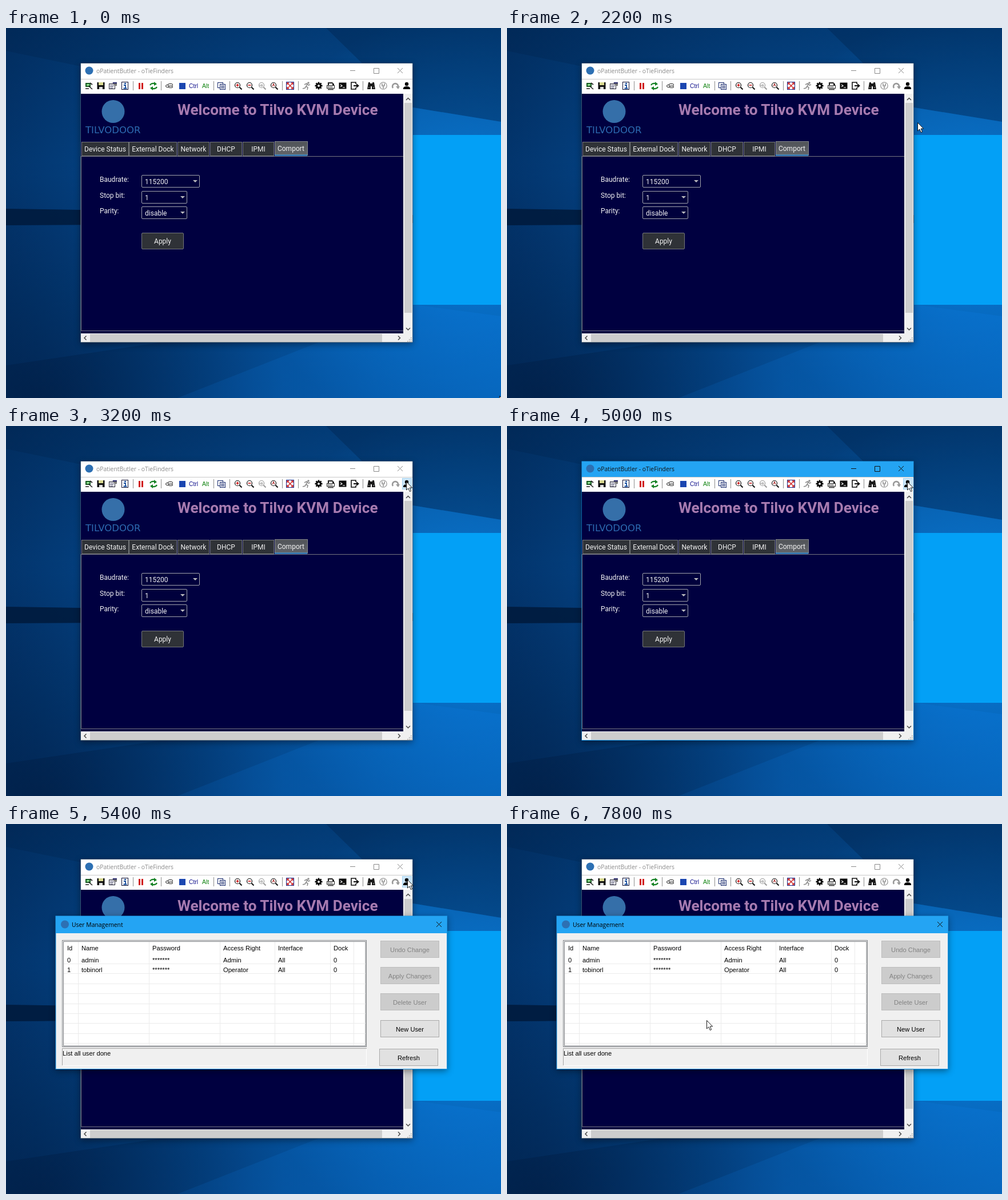
Animation of 866 by 647 pixels, one loop 8000 ms. Source, as an HTML page:

```html
<!DOCTYPE html>
<html lang="en">
<head>
<meta charset="utf-8">
<title>User management</title>
<style>
html, body { margin: 0; width: 100%; height: 100%; overflow: hidden; background: #04407f; }
svg { display: block; }
text { white-space: pre; }
.cap { font: 10.4px "Open Sans", sans-serif; }
.web { font: 12px Roboto, sans-serif; fill: #f2f2f2; }
.win { font: 11.15px "Liberation Sans", Arial, sans-serif; }
.key { font: 10.3px "Liberation Sans", Arial, sans-serif; }
.mid { text-anchor: middle; }
.shade { filter: drop-shadow(0 3px 6px rgba(0,0,0,.42)); }
.ln { fill: none; stroke: currentColor; }
</style>
</head>
<body>
<svg id="stage" width="866" height="647" viewBox="0 0 866 647">
  <defs>
    <linearGradient id="base"><stop stop-color="#023268"/><stop offset=".5" stop-color="#044b92"/><stop offset="1" stop-color="#0559a8"/></linearGradient>
    <linearGradient id="dusk" x2="0" y2="1"><stop stop-color="#001c40" stop-opacity=".4"/><stop offset=".4" stop-color="#001c40" stop-opacity="0"/></linearGradient>
    <radialGradient id="corner" gradientUnits="userSpaceOnUse" cx="60" cy="660" r="430"><stop stop-color="#001434" stop-opacity=".6"/><stop offset="1" stop-color="#001434" stop-opacity="0"/></radialGradient>
    <radialGradient id="glow" gradientUnits="userSpaceOnUse" cx="800" cy="350" r="380"><stop stop-color="#0a8cee" stop-opacity=".7"/><stop offset="1" stop-color="#0a7ee0" stop-opacity="0"/></radialGradient>
    <linearGradient id="beam"><stop stop-color="#0a6ccc" stop-opacity=".06"/><stop offset="1" stop-color="#0a7ade" stop-opacity=".3"/></linearGradient>
    <linearGradient id="tabOn" x2="0" y2="1"><stop stop-color="#505358"/><stop offset="1" stop-color="#63666b"/></linearGradient>
  </defs>
  <g id="wall">
    <path fill="url(#base)" d="M0 0H866V647H0z"/>
    <path fill="url(#dusk)" d="M0 0H866V647H0z"/>
    <path fill="url(#corner)" d="M0 0H866V647H0z"/>
    <path fill="url(#glow)" d="M0 0H866V647H0z"/>
    <path fill="url(#beam)" d="M714 188L0 40V316L714 327zM714 341L0 345V590L714 484zM714 484L866 504V647H300z"/>
    <path fill="#00244e" opacity=".4" d="M560 0H866V164L700 137z"/>
    <path fill="#0d74c8" opacity=".35" d="M700 137L866 164V190H700z"/>
    <path fill="#011b3d" opacity=".85" d="M0 316L712 327V341L0 345z"/>
    <path fill="#03a0f6" d="M712 187h297v297h-297z"/>
  </g>
  <g id="viewer"></g>
  <g id="dialog"></g>
  <path id="cursor" fill="#fff" stroke="#000" stroke-width=".9" d="M.5.5V15L3.8 11.9L6.3 17.6L8.6 16.6L6.2 11H10.6z"/>
</svg>
<script>
const $ = id => document.getElementById(id);
const rect = (x, y, w, h, fill, more = '') =>
  `<rect x="${x}" y="${y}" width="${w}" height="${h}" fill="${fill}" ${more}/>`;
const box = (x, y, w, h, fill, edge, more = '') =>
  rect(x + .5, y + .5, w - 1, h - 1, fill, `stroke="${edge}" ${more}`);
const text = (x, y, s, cls, fill) =>
  `<text x="${x}" y="${y}" class="${cls}"${fill ? ` fill="${fill}"` : ''}>${s}</text>`;
const path = (d, color, w = 1) =>
  `<path d="${d}" class="ln" color="${color}" stroke-width="${w}"/>`;
const solid = (d, fill) => `<path d="${d}" fill="${fill}"/>`;
const dot = (x, y, r, fill) => `<circle cx="${x}" cy="${y}" r="${r}" fill="${fill}"/>`;

// Toolbar icons, drawn around their own centre
const lens = (c, inner) =>
  `<circle cx="-1" cy="-1" r="4.5" fill="#fff" stroke="${c}" stroke-width="1.2"/>` +
  path('M2.5 2.5L6.5 6.5', c, 2) + inner;
const spokes = [0, 45, 90, 135].map(a => `<path d="M0-6.5V6.5" stroke="#000" stroke-width="2.6" transform="rotate(${a})"/>`).join('');
const icons = [
  [145, rect(-6, -5, 9, 7, '#175b23') + rect(-4, -3, 5, 3, '#8fe08f') + path('M-1 0L6 6M-6 5H0M2-5L6-2', '#222', 1.6)],
  [166, rect(-6.5, -6, 13, 12, '#111') + rect(-4, -6, 8, 5, '#d8d890') + rect(-3, 2, 6, 4, '#ddd')],
  [187, box(-7, -4, 11, 10, '#fff', '#223') + path('M-5-1H2M-5 1.5H1M-5 4H0', '#446') + solid('M-1-6H7V0H3z', '#777') + path('M0-5H7', '#226', 2)],
  [208, box(-6, -7, 12, 14, '#fff', '#113') + rect(-1, -5, 3, 2, '#124a9c') + path('M-2-1H1V4M-2.5 4.5H3.5', '#124a9c', 1.8)],
  [236, rect(-4, -5, 3, 11, '#d01818') + rect(1, -5, 3, 11, '#d01818')],
  [258, path('M-6-1Q-4-5 2-4M6 2Q4 6-2 5', '#138022', 2.2) + solid('M1-7L6-3L1 0zM-1 8L-6 4L-1 1z', '#138022')],
  [286, box(-7, -2, 8, 5, '#eee', '#222', 'rx="2"') + box(-3, -4, 9, 5, '#eee', '#222', 'rx="2"') + box(-2, 0, 8, 4, '#eee', '#222', 'rx="2"')],
  [308, rect(-5, -5, 11, 11, '#1b46b0')],
  [377, box(-7, -6, 10, 10, '#fff', '#16286c') + box(-3, -3, 10, 10, '#fff', '#16286c') + path('M-1 0H5M-1 2H5M-1 4H5', '#16286c')],
  [406, lens('#111', path('M-3.5-1H1.5M-1-3.5V1.5', '#c11', 1.5))],
  [427, lens('#111', path('M-3.5-1H1.5', '#c11', 1.5))],
  [448, lens('#999', path('M-3.5-2V1M-1.5-2H.5V1H-1.5z', '#999'))],
  [469, lens('#111', path('M-3 1L-1-4L1 1M-2-1H0', '#a22'))],
  [497, box(-7, -7, 14, 14, '#fff', '#1a2a8c') + path('M-5-5L5 5M5-5L-5 5', '#c22', 1.4) + path('M-5-2V-5H-2M2-5H5V-2M5 2V5H2M-2 5H-5V2', '#c22', 1.5)],
  [526, dot(3, -5, 1.8, '#8d8d8d') + path('M-4-2L0-4L3-1L6-2M1-3L-1 1L2 3L1 7M-1 1L-3 4L-7 5', '#8d8d8d', 1.6)],
  [547, spokes + dot(0, 0, 4.8, '#000') + dot(0, 0, 2, '#fff')],
  [568, solid('M-5-6H3L6-3V0H-5z', '#222') + rect(-3, -4, 6, 3, '#fff') + box(-7, -1, 14, 6, '#fff', '#222') + path('M-4 1V3M-1 1V3M2 1V3M-5 6.5H5', '#222', 1.5)],
  [589, rect(-6.5, -5.5, 13, 11, '#0a0a0a') + path('M-4-2L-1 0L-4 2M0 3H4', '#fff', 1.2)],
  [610, path('M2-3V-6H-6V6H2V3', '#111', 1.6) + path('M-2 0H5', '#111', 2) + solid('M3-4L8 0L3 4z', '#111')],
  [639, solid('M-5-6H-2V-4H2V-6H5L7 6H1V1H-1V6H-7z', '#1b1b1b') + path('M-5 3H-3M3 3H5', '#bbb')],
  [660, `<circle r="6.2" fill="#fff" stroke="#999" stroke-width="1.3"/>` + path('M-2-4V0H2V-4M0 0V5', '#999', 1.7)],
  [681, path('M-4 4A5 5 0 1 1 5 2', '#999', 2.6) + solid('M1 1H8L5 6z', '#999')],
  [701, dot(0, -3, 3.2, '#000') + solid('M-6 6V4Q-5 1 0 1Q5 1 6 4V6z', '#000')]
];
const toolbar = icons.map(([x, art]) => `<g transform="translate(${x} 101)">${art}</g>`).join('') +
  path([222, 271, 363, 391, 483, 511, 624].map(x => `M${x}.5 93V109`).join(''), '#8c8c8c') +
  text(320, 104.5, 'Ctrl', 'key', '#10108c') + text(343, 104.5, 'Alt', 'key', '#0b800b');

const tabs = [
  [132, 83, 'Device Status'], [215, 84, 'External Dock'], [300, 56, 'Network'],
  [357, 56, 'DHCP'], [414, 55, 'IPMI']
].map(([x, w, s]) => box(x, 199, w, 25, '#2f3237', '#75787b') + text(x + w / 2, 216, s, 'web mid')).join('') +
  box(470, 198, 58, 25, 'url(#tabOn)', '#85888b') + rect(470, 221.5, 57, 2, '#3c94d4') +
  text(498.5, 215, 'Comport', 'web mid');

const fields = [['Baudrate:', '115200', 257, 102], ['Stop bit:', '1', 285, 80], ['Parity:', 'disable', 312, 80]]
  .map(([label, value, y, w]) => text(164, y + 12, label, 'web') +
    box(237, y, w, 22, '#00003c', '#a2a4aa', 'rx="1.5"') + text(243, y + 16, value, 'web') +
    solid(`M${237 + w - 12} ${y + 9}h8l-4 4z`, '#b8b8bc')).join('');

const scrollbars = rect(695, 115, 16, 419, '#f0f0f0') + rect(131, 534, 580, 15, '#f0f0f0') +
  rect(697, 131, 13, 367, '#cdcdcd') + rect(147, 535, 511, 14, '#cdcdcd') +
  path('M700 126L703.5 122.5L707 126M700 524.5L703.5 528L707 524.5M140.5 538.5L137 542L140.5 545.5M686 538.5L689.5 542L686 545.5', '#4a4a4a', 1.5) +
  [[708, 541], [705, 544], [708, 544], [702, 547], [705, 547], [708, 547]].map(([x, y]) => rect(x, y, 1.6, 1.6, '#aaa')).join('');

$('viewer').innerHTML =
  rect(130.5, 61.5, 581, 488.5, '#6d7b88', 'id="frame" class="shade"') +
  rect(131, 62, 580, 28, '#fff', 'id="bar"') + rect(131, 90, 580, 25, '#fff') +
  path('M131 89.5H711', '#c9c9c9') +
  dot(145.5, 74.5, 7, '#2d70b3') +
  `<g id="caption">${text(158, 79, 'oPatientButler - oTieFinders', 'cap', 'currentColor') +
    path('M602 74.5H611M643.5 70.5H652.5V79.5H643.5zM685 70L694 79M694 70L685 79', 'currentColor')}</g>` +
  box(693, 91, 17, 20, '#cce6f8', '#a6d3f0', 'id="hover"') + toolbar +
  rect(131, 115, 564, 419, '#000040') +
  dot(187.5, 146, 20, '#356fa9') +
  `<text x="139" y="184" fill="#2d6bb0" style="font:16.5px 'DejaVu Sans',sans-serif">TILVODOOR</text>` +
  `<text x="300" y="152" fill="#a77bb0" style="font:bold 26.15px Roboto,sans-serif">Welcome to Tilvo KVM Device</text>` +
  path('M131.5 224V529.5H695M131 224.5H695', '#74747f') +
  tabs + fields + box(237, 358, 74, 29, '#2f3237', '#74777a', 'rx="1.5"') +
  text(274, 377, 'Apply', 'web mid') + scrollbars;

const cols = [107, 132, 256, 380, 476, 573];
const rows = [
  [221, 'Id', 'Name', 'Password', 'Access Right', 'Interface', 'Dock'],
  [241.5, 0, 'admin', '*******', 'Admin', 'All', 0],
  [259, 1, 'tobinorl', '*******', 'Operator', 'All', 0]
].map(([y, ...cells]) => cells.map((s, i) => text(cols[i], y, s, 'win')).join('')).join('');
const grid = [126.5, 250.5, 374.5, 470.5, 567.5, 608.5].map(x => `M${x} 206V387`).join('') +
  Array.from({ length: 9 }, (_, i) => `M101 ${Math.round(244 + i * 17.4) + .5}H629`).join('');
const buttons = [
  [655, 204, 'Undo Change'], [655, 250, 'Apply Changes'], [655, 296, 'Delete User'],
  [655, 343, 'New User', 1], [653, 393, 'Refresh', 1]
].map(([x, y, s, on]) => box(x, y, 103, 30, on ? '#e1e1e1' : '#ccc', on ? '#a9a9a9' : '#bdbdbd') +
  text(x + 51.5, y + 19.5, s, 'win mid', on ? '#000' : '#838383')).join('');

$('dialog').innerHTML =
  rect(86.5, 160.5, 685.5, 268.5, '#1c97e6', 'class="shade"') +
  rect(87, 161, 684, 30, '#24a4f3') + rect(87.5, 191, 683.5, 237, '#f0f0f0') +
  dot(103, 175.5, 7, '#2d70b3') + text(115, 180, 'User Management', 'cap') +
  path('M753 171L762 180M762 171L753 180', '#111') +
  box(98, 203, 533, 187, '#fff', '#85888c') + box(100, 205, 529.5, 183.5, '#fff', '#75787c') +
  path(grid, '#ebebeb') + rows +
  path('M98.5 422V392.5H631', '#a3a3a3') + path('M99 422.5H630.5V393', '#fff') +
  text(99, 405, 'List all user done', 'win') + buttons;

// Pointer stops: time, x, y
const away = 999;
const stops = [
  [0, 863, 643], [200, away, 0], [1200, 57, 141], [1400, away, 0],
  [1800, 769, 489], [2000, 752, 322], [2200, 718, 165], [2400, 622, 108], [2600, 566, 97],
  [2800, 699, 97], [3000, 763, 488], [3200, 700, 97], [5200, 702, 97],
  [5600, 560, 122], [5800, 352, 158], [6000, 195, 176], [6200, 150, 171], [6400, 117, 170],
  [6600, 134, 173], [6800, 170, 177], [7000, 195, 178], [7200, 179, 176],
  [7600, 406, 262], [7800, 349, 343]
];
const show = (id, on) => $(id).setAttribute('visibility', on ? 'visible' : 'hidden');

function draw() {
  const t = performance.now() % 8000;
  const within = (a, b) => t >= a && t < b;
  const [, x, y] = stops.findLast(s => s[0] <= t);
  $('cursor').setAttribute('transform', `translate(${x} ${y})`);

  const active = within(5000, 5200);
  $('bar').setAttribute('fill', active ? '#24a4f3' : '#fff');
  $('frame').setAttribute('fill', active ? '#1c97e6' : '#6d7b88');
  $('caption').setAttribute('color', active ? '#111' : '#8a8a8a');

  show('hover', within(2600, 5600));
  $('hover').setAttribute('x', t < 2800 ? 561.5 : 693.5);

  const opening = within(5200, 5400);
  show('dialog', t >= 5200);
  $('dialog').setAttribute('opacity', opening ? .52 : 1);
  $('dialog').setAttribute('transform', opening ? 'translate(8.58 5.9) scale(.98)' : '');
  requestAnimationFrame(draw);
}
draw();
</script>
</body>
</html>
```
